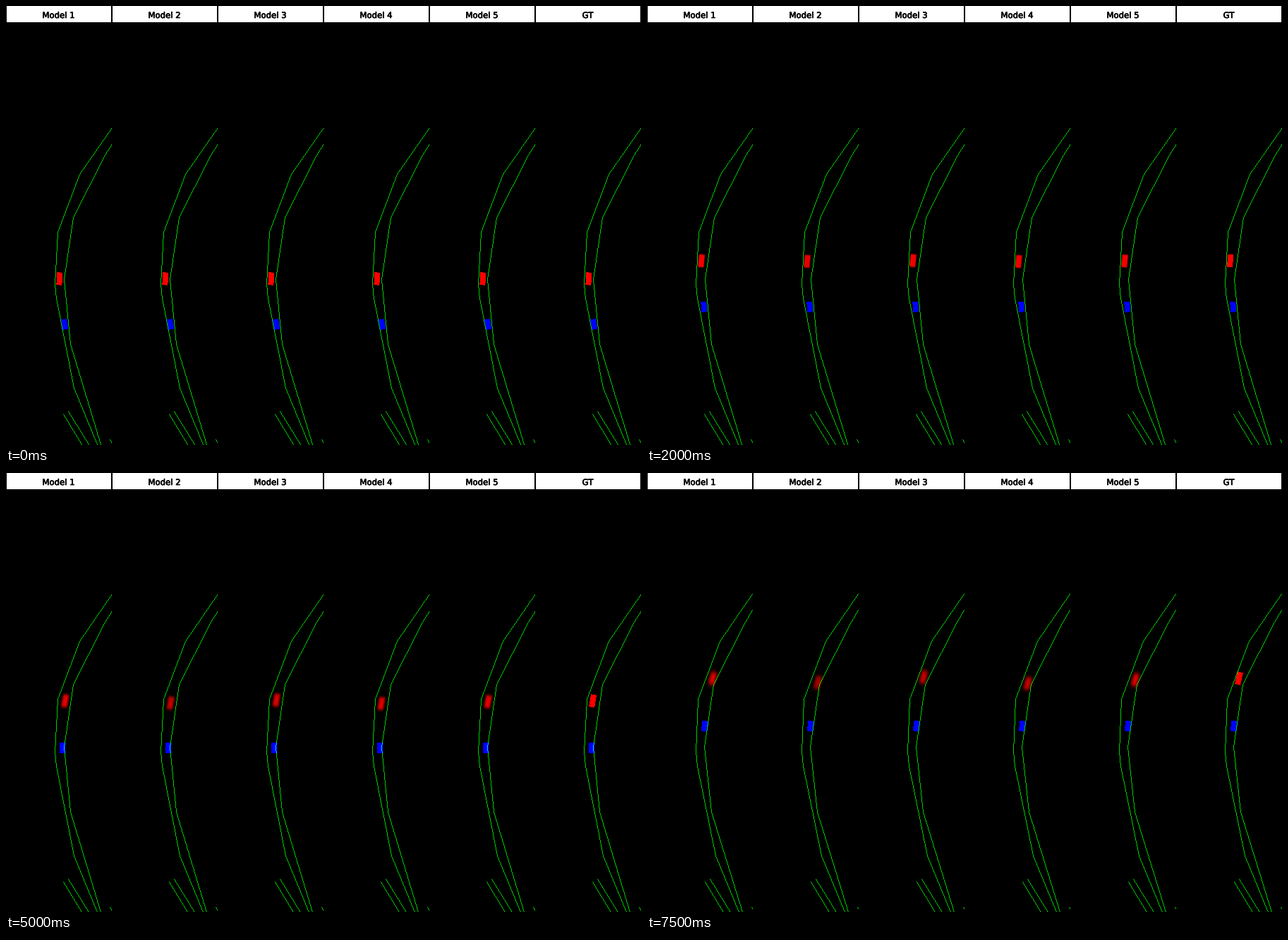
These frames come from a looping animation (900x622 px, 8 s). A matplotlib script:

```python
import numpy as np
import matplotlib.pyplot as plt
from matplotlib import patheffects
from matplotlib.animation import FuncAnimation

W, H, DPI = 900, 622, 100
CELL, HEAD = 150, 23
FRAMES, STEP = 16, 500
GREEN = 0.8

# Final forecast error of each model: x, y, loss of brightness
MODELS = [(4, 0, 0.12), (3, 5.5, 0.35), (3, -2, 0.2),
          (0.6, 7, 0.2), (3, 2, 0.12)]
TITLES = [f"Model {i + 1}" for i in range(len(MODELS))] + ["GT"]

ROAD = [
    [(150, 172), (104, 238), (73, 320), (69, 394), (71, 414),
     (96, 541), (129, 621)],
    [(150, 195), (140, 211), (95, 299), (82, 387), (91, 479), (134, 621)],
    [(81, 578), (107, 621)],
    [(88, 574), (117, 621)],
    [(147, 614), (150, 619)],
]

yy, xx = np.mgrid[0:H, 0:CELL]


def polyline(mask, pts):
    """One pixel wide path without smoothing."""
    for a, b in zip(pts, pts[1:]):
        k = int(np.abs(b - a).max()) + 1
        x, y = np.rint(np.linspace(a, b, k)).astype(int).T
        ok = (x < CELL) & (y < H)
        mask[y[ok], x[ok]] = GREEN


def lanes(t):
    """Road edges; the view stretches by about a pixel over the loop."""
    mask = np.zeros((H, CELL))
    for line in ROAD:
        p = np.array(line, float)
        y = p[:, 1].copy()
        p[:, 0] += 0.6 * t * np.clip((y - 440) / 60, -1, 1)
        p[:, 1] += t * np.clip((y - 270) / 120, -1, 1)
        polyline(mask, np.rint(p))
    return mask


def box(cx, cy, w, h, tilt, soft=0):
    """Tilted rectangle; soft > 0 smears its edges, most along its length."""
    a = np.radians(tilt)
    dx, dy = xx - cx, yy - cy
    u = w / 2 - np.abs(dx * np.cos(a) + dy * np.sin(a))
    v = h / 2 - np.abs(dy * np.cos(a) - dx * np.sin(a))
    if not soft:
        return ((u >= 0) & (v >= 0)).astype(float)
    m = (1 + np.tanh(u / soft)) * (1 + np.tanh(v / (1.4 * soft)))
    m /= m.max()
    return np.where(m < 0.02, 0, m)


def scene(n):
    t = n / (FRAMES - 1)
    x, y, tilt = 75.2 + 13.3 * t**2, 386 - 95.5 * t, 2 + 11 * t
    blue = box(79.3 + 10 * (t - 0.58)**2, 450.5 - 92.5 * t, 8, 14.5,
               14 * t - 9)
    cells = []
    for dx, dy, loss in MODELS:
        grow = t**1.5
        red = box(x + dx * grow, y + dy * grow, 8, 18, tilt + 2 * t, 2.5 * t)
        cells.append(red * (1 - loss * t))
    cells.append(box(x, y, 8, 18, tilt))

    green = lanes(t)
    img = np.hstack([np.dstack([red, green, blue]) for red in cells])
    img[:HEAD] = 1
    img[:HEAD, ::CELL] = img[:HEAD, CELL - 1::CELL] = 0
    return img


fig = plt.figure(figsize=(W / DPI, H / DPI), dpi=DPI, facecolor="black")
ax = fig.add_axes([0, 0, 1, 1])
ax.axis("off")
view = ax.imshow(scene(0), extent=(0, W, H, 0), interpolation="nearest",
                 aspect="auto")
bold = [patheffects.withStroke(linewidth=0.5, foreground="black")]
for i, title in enumerate(TITLES):
    ax.text((i + 0.5) * CELL - 0.5, 17, title, family="DejaVu Sans", size=8.4,
            ha="center", va="baseline", color="black", path_effects=bold)
ax.set_xlim(0, W)
ax.set_ylim(H, 0)


def update(n):
    view.set_data(scene(n))
    return [view]


anim = FuncAnimation(fig, update, frames=FRAMES, interval=STEP,
                     repeat=True, repeat_delay=0)
plt.show()
```
